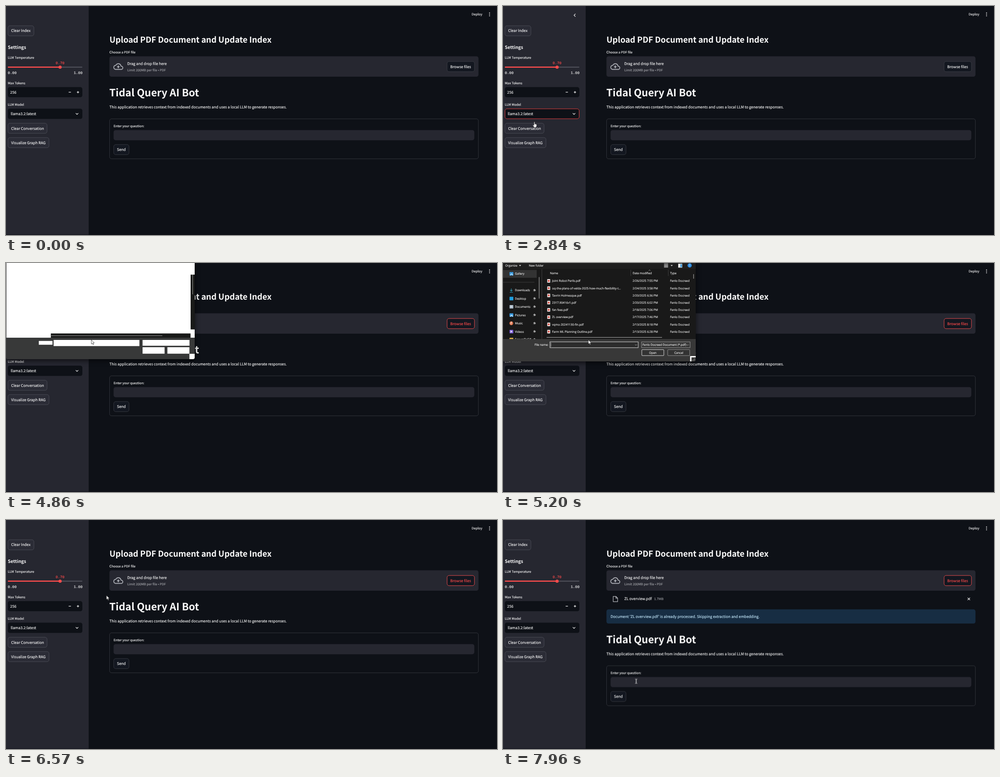
An HTML page that plays this animation: 1093 by 512 pixels, repeating every 8000 ms.

```html
<!DOCTYPE html>
<html lang="en">
<head>
<meta charset="utf-8">
<title>Document assistant</title>
<style>
html, body { margin: 0; width: 100%; height: 100%; overflow: hidden; background: #0e1117; }
svg { display: block; width: 1093px; height: 512px; }
text {
  font: 8.28px "Noto Sans CJK JP", "Noto Sans CJK SC", "Noto Sans CJK KR", "Noto Sans CJK", sans-serif;
  color: #fafafa; fill: currentColor; stroke: currentColor; stroke-width: .14px;
  text-rendering: geometricPrecision; white-space: pre;
}
.small { font-size: 7.24px; }
.muted { color: #a3a4a9; }
.mono { font: 8.2px "Liberation Mono", "Noto Sans Mono", monospace; }
.h1, .h2, .h3 { font-weight: 700; stroke: none; }
.h1 { font-size: 22.6px; }
.h2 { font-size: 18.2px; letter-spacing: -.07px; }
.h3 { font-size: 10.1px; }
.red { color: #ff4b4b; }
.btn { fill: #2b2c36; stroke: #54555d; stroke-width: .8; }
.main .btn { fill: #131720; stroke: #40434a; }
.field { fill: #0e1117; }
.panel { fill: #262730; }
.line { fill: none; stroke: #fafafa; stroke-width: 1.2; }
.ring { fill: none; stroke: #ff4b4b; stroke-width: .9; }
#dialog text { font: 6.45px "Open Sans", "Noto Sans", sans-serif; color: #f0f0f0; }
.shadow { filter: drop-shadow(0 3px 6px rgba(0,0,0,.65)); }
.thin { fill: none; stroke: #bbb; stroke-width: .8; }

.step { animation: 8s step-end infinite; }
.flow { animation: 8s linear infinite; }
@keyframes collapse { 0%, 36.5% { opacity: 0 } 10.6% { opacity: 1 } }
@keyframes focus { 0%, 51.6% { opacity: 0 } 12.5% { opacity: 1 } }
@keyframes caret {
  0%, 24.25%, 33.75%, 42%, 51.6% { opacity: 0 }
  12.5%, 30.5%, 35.75%, 48% { opacity: 1 }
}
@keyframes menu { 0%, 35.5% { opacity: 0 } 13.5% { opacity: 1 } }
@keyframes browse { 0% { opacity: 0 } 48% { opacity: 1 } }
@keyframes running { 0%, 41.25%, 92.5% { opacity: 0 } 37%, 85% { opacity: 1 } }
@keyframes uploaded { 0% { opacity: 0 } 82.5% { opacity: 1 } }
@keyframes notice { 0% { opacity: 0 } 92.5% { opacity: 1 } }
@keyframes shift {
  0% { transform: translateY(0) }
  82.5% { transform: translateY(32.2px) }
  92.5% { transform: translateY(73.5px) }
}
@keyframes anchor { 0%, 92.5% { opacity: 0 } 84.5% { opacity: 1 } }
@keyframes blank { 0%, 61.75% { opacity: 0 } 60% { opacity: 1 } }
@keyframes dialog {
  0%, 79.1% { opacity: 0 }
  61.75% { opacity: 1; transform: scale(.99) }
  62.6% { opacity: 1; transform: none }
}
@keyframes hover {
  0% { opacity: 0 }
  68% { opacity: 1; transform: translateY(32.4px) }
  70.5% { opacity: 1; transform: translateY(16.2px) }
  73.1% { opacity: 1; transform: none }
}
@keyframes arrow { 0%, 11.1%, 48%, 85% { opacity: 0 } 1.5%, 35.75%, 52% { opacity: 1 } }
@keyframes beam { 0%, 23.5% { opacity: 0 } 11.1%, 85% { opacity: 1 } }
@keyframes hand { 0%, 35.75%, 52% { opacity: 0 } 23.5%, 48% { opacity: 1 } }
@keyframes path {
  0%, 1.5% { transform: translate(857px, 473px) }
  6.2% { transform: translate(470px, 325px) }
  11.1% { transform: translate(154px, 242px) }
  13.5%, 21.1% { transform: translate(161px, 246px) }
  25% { transform: translate(115px, 268px) }
  28%, 33.5% { transform: translate(72px, 262px) }
  33.75%, 35.5% { transform: translate(69px, 259px) }
  39.5% { transform: translate(400px, 311px) }
  44.75% { transform: translate(1060px, 215px) }
  48.5%, 51.6% { transform: translate(1030px, 136px) }
  55% { transform: translate(775px, 240px) }
  56.5% { transform: translate(680px, 254px) }
  60.5%, 66.6% { transform: translate(190px, 172px) }
  70% { transform: translate(100px, 150px) }
  76%, 80% { transform: translate(143.5px, 117px) }
  86.9% { transform: translate(402px, 284px) }
  88.6%, 90% { transform: translate(404.5px, 282px) }
  97% { transform: translate(306px, 359px) }
  99.5%, 100% { transform: translate(296.5px, 360.5px) }
}
</style>
</head>
<body>
<svg viewBox="0 0 1093 512">
  <rect width="1093" height="512" fill="#0e1117"/>

  <!-- sidebar -->
  <rect class="panel" width="184" height="512"/>
  <rect y="510.5" width="1093" height="1.5" fill="#0b0d13" opacity=".6"/>
  <path class="line step" style="animation-name:collapse" d="M161.3 17.5l-3.2 3.2 3.2 3.2"/>
  <rect class="btn" x="4.3" y="44.2" width="57.8" height="22.6" rx="4.4"/>
  <text x="11.5" y="58.4">Clear Index</text>
  <text class="h3" x="4" y="96">Settings</text>
  <text class="small" x="4" y="118">LLM Temperature</text>
  <rect x="4" y="135.6" width="166" height="2.3" rx="1.1" fill="#4b4c56"/>
  <rect x="4" y="135.6" width="117" height="2.3" rx="1.1" fill="#ff4b4b"/>
  <circle cx="120.4" cy="136.7" r="3.5" fill="#ff4b4b"/>
  <text class="mono red" x="120.4" y="130" text-anchor="middle">0.70</text>
  <text class="mono" x="4" y="152.3">0.00</text>
  <text class="mono" x="170.3" y="152.3" text-anchor="end">1.00</text>
  <text class="small" x="4" y="174.6">Max Tokens</text>
  <rect class="field" x="4" y="181.3" width="166" height="22.7" rx="4.6"/>
  <text x="9.3" y="196">256</text>
  <path class="line" d="M139.5 192.7h5M157.7 192.7h5M160.2 190.2v5"/>
  <text class="small" x="4" y="222.9">LLM Model</text>
  <rect class="field" x="4" y="229.5" width="166" height="23" rx="4.6"/>
  <rect class="ring step" style="animation-name:focus" x="4.4" y="229.9" width="165.2" height="22.2" rx="4.4"/>
  <text x="10.5" y="244.1">llama3.2:latest</text>
  <rect class="step" style="animation-name:caret" x="68.1" y="235.5" width=".8" height="11" fill="#fafafa"/>
  <path class="line" d="M155.3 239.6l2.8 2.8 2.8-2.8"/>
  <rect class="btn" x="4.3" y="262.1" width="87" height="22.6" rx="4.4"/>
  <text x="11.5" y="276.5">Clear Conversation</text>
  <rect class="btn" x="4.3" y="294.2" width="91.4" height="22.6" rx="4.4"/>
  <text x="11.5" y="308.7">Visualize Graph RAG</text>
  <g class="step" style="animation-name:menu">
    <path class="field shadow" d="M4 253h166v41.5q0 4.5-4.5 4.5h-157q-4.5 0-4.5-4.5z"/>
    <rect class="panel" x="4" y="253" width="166" height="23"/>
    <text x="13.2" y="267.6">llama3.2:latest</text>
    <text x="13.2" y="290.5">deepseek-r1:14b</text>
  </g>

  <!-- header -->
  <g class="step" style="animation-name:running">
    <g fill="none" stroke="#85878d" stroke-width="1.5">
      <path d="M938.5 16.6h10M943.5 17v4M942.1 16.6v8.2M944.9 16.6v8.2"/>
      <circle cx="943.5" cy="13.6" r="1" fill="#85878d" stroke-width=".6"/>
    </g>
    <text class="small muted" x="955.5" y="21.4">RUNNING...</text>
    <text class="small" x="1005.8" y="21.4">Stop</text>
  </g>
  <text class="small" x="1036.5" y="21.4">Deploy</text>
  <path d="M1076.4 15.3h0m0 3.3h0m0 3.3h0" stroke="#fafafa" stroke-width="2" stroke-linecap="round"/>

  <!-- main page -->
  <g class="main">
    <text class="h2" x="230.3" y="81.7">Upload PDF Document and Update Index</text>
    <text class="small" x="230.3" y="106">Choose a PDF file</text>
    <rect class="panel" x="230.3" y="112.5" width="821.5" height="45.5" rx="4.6"/>
    <path transform="translate(239 124.4) scale(.915)" fill="#a5a7ae" d="M19.35 10.04A7.49 7.49 0 0 0 12 4C9.11 4 6.6 5.64 5.35 8.04A6 6 0 0 0 0 14c0 3.31 2.69 6 6 6h13c2.76 0 5-2.24 5-5 0-2.64-2.05-4.78-4.65-4.96zM19 18H6c-2.21 0-4-1.79-4-4 0-2.05 1.53-3.76 3.56-3.97l1.07-.11.5-.95A5.47 5.47 0 0 1 12 6c2.62 0 4.88 1.86 5.39 4.43l.3 1.5 1.53.11A2.98 2.98 0 0 1 22 15c0 1.65-1.35 3-3 3zM8 13h2.55v3h2.9v-3H16l-4-4z"/>
    <text x="270" y="132">Drag and drop file here</text>
    <text class="small muted" x="270" y="146.3">Limit 200MB per file • PDF</text>
    <rect class="btn" x="981.9" y="124.1" width="60.9" height="22.7" rx="4.4"/>
    <text x="989" y="138.5">Browse files</text>
    <g class="step" style="animation-name:browse">
      <rect class="ring" x="981.9" y="124.1" width="60.9" height="22.7" rx="4.4" style="fill:#131720"/>
      <text class="red" x="989" y="138.5">Browse files</text>
    </g>
    <g class="step" style="animation-name:uploaded">
      <path fill="none" stroke="#b9bbc0" stroke-width="1.2" d="M245.3 170.8h6.2l3.7 3.7v8.2h-9.9zM251.3 170.8v4h4"/>
      <text x="270" y="178.9">ZL overview.pdf</text>
      <text class="small muted" x="336.5" y="178.9">1.7MB</text>
      <path class="line" d="M1034.3 173.8l5.4 5.4m0-5.4l-5.4 5.4"/>
    </g>
    <g class="step" style="animation-name:notice">
      <rect x="230.3" y="199.8" width="821.5" height="31.8" rx="4.6" fill="#172d43"/>
      <text x="239.5" y="219.2" style="color:#c7ebff">Document 'ZL overview.pdf' is already processed. Skipping extraction and embedding.</text>
    </g>
    <g class="step" style="animation-name:shift">
      <text class="h1" x="230" y="202.3">Tidal Query AI Bot</text>
      <path class="step" style="animation-name:anchor" fill="none" stroke="#85878d" d="M437.2 194.3h-1.5a2.1 2.1 0 0 0 0 4.2h1.5M438.8 194.3h1.5a2.1 2.1 0 0 1 0 4.2h-1.5M436.2 196.4h3.6"/>
      <text x="230.3" y="228.8">This application retrieves context from indexed documents and uses a local LLM to generate responses.</text>
      <rect x="230.6" y="252.3" width="821" height="89.4" rx="4.4" fill="none" stroke="#3e4147" stroke-width=".8"/>
      <text class="small" x="239.5" y="270.5">Enter your question:</text>
      <rect class="panel" x="239.5" y="277.4" width="803" height="22.8" rx="4.6"/>
      <rect class="btn" x="239.8" y="309.8" width="34" height="22.6" rx="4.4"/>
      <text x="247" y="324.1">Send</text>
    </g>
  </g>

  <!-- file chooser before its controls are painted -->
  <g class="step" style="animation-name:blank">
    <path class="shadow" fill="#383939" d="M0 0h420v211q0 4-4 4h-412q-4 0-4-4z"/>
    <path fill="#fff" d="M1 0h419v167h-419zM73 174.3h30.5v8.5h-30.5zM106 172h191v13.8h-191zM304 172h104.5v13h-104.5zM304 188.3h49v14.5h-49zM359.3 188.3h49v14.5h-49zM408.3 203h11.7v8q0 4-4 4h-7.7z"/>
    <path fill="#191a19" d="M411 26h9v122.5h-9zM99.8 157.5h311v9.5h-311z"/>
    <path fill="none" stroke="#999" d="M415.5 26v44M100.5 162.5h247.5"/>
  </g>

  <!-- file chooser -->
  <g id="dialog" class="step" style="animation-name:dialog">
    <path class="shadow" fill="#191919" d="M0 0h429v216q0 4-4 4h-425z"/>
    <rect width="429" height="13.5" fill="#1f1f1f"/>
    <text x="5" y="8.2">Organize</text>
    <text x="57.5" y="8.2">New folder</text>
    <path fill="#ddd" d="M35.5 4.6h5l-2.5 2.7zM373 4.6h5l-2.5 2.7z"/>
    <path fill="none" stroke="#ccc" stroke-width="1.3" d="M358.5 2.2h9M358.5 4.6h9M358.5 7h9M358.5 9.4h9"/>
    <rect x="390" y="1.7" width="9" height="8.6" fill="#eee"/>
    <rect x="395" y="2.7" width="3.2" height="6.6" fill="#2a8fd6"/>
    <circle cx="415.5" cy="5.5" r="4.7" fill="#2b8be0"/>
    <text x="415.5" y="8" text-anchor="middle">?</text>
    <rect y="15.5" width="75" height="17.5" fill="#333"/>
    <path fill="none" stroke="#3f3f3f" d="M0 43h70M86.5 14v156M284.5 15v14M368 15v14"/>
    <path stroke="#999" stroke-width="1.3" d="M80.5 31.5v48M424.3 25v10M97 166.3h257"/>
    <path class="thin" d="M324 17.3l2.2-2 2.2 2"/>
    <g id="places"></g>
    <text x="104.5" y="24.7">Name</text>
    <text x="288.5" y="24.7">Date modified</text>
    <text x="372" y="24.7">Type</text>
    <rect class="step" style="animation-name:hover" x="95" y="113.5" width="324" height="14.5" fill="#4b4b4b"/>
    <g id="files"></g>
    <path fill="#383838" d="M0 170h429v46q0 4-4 4h-425z"/>
    <text x="101" y="185.2" text-anchor="end">File name:</text>
    <rect x="104.5" y="176.3" width="196.5" height="13" fill="#2c2c2c" stroke="#eee" stroke-width=".9"/>
    <path stroke="#eee" stroke-width=".7" d="M106.7 178v9.5"/>
    <path class="thin" d="M293.8 182l2.2 2.2 2.2-2.2M409 182l2.2 2.2 2.2-2.2"/>
    <rect x="308.5" y="176.3" width="108" height="13" fill="none" stroke="#aaa" stroke-width=".8"/>
    <svg x="309" y="176" style="width:96.5px;height:14px"><text x="1.5" y="9.2">Fenlo Docreed Document (*.pdf)</text></svg>
    <rect x="309" y="193.7" width="49" height="13.3" rx="1" fill="#333" stroke="#f2f2f2" stroke-width=".9"/>
    <rect x="366.7" y="193.7" width="49" height="13.3" rx="1" fill="#333" stroke="#aaa" stroke-width=".8"/>
    <text x="333.5" y="202.5" text-anchor="middle">Open</text>
    <text x="391.2" y="202.5" text-anchor="middle">Cancel</text>
    <path fill="#fff" d="M416.5 208h12.5v3h-9.5v9h-3z"/>
    <path fill="none" stroke="#aaa" stroke-width="1.2" stroke-dasharray="1.2 1" d="M426.5 213.5v5M424.3 215.7v3M422 217.5v1.2"/>
  </g>

  <!-- pointer -->
  <g class="flow" style="animation-name:path" stroke-linejoin="round">
    <path class="step" style="animation-name:arrow" fill="#fff" stroke="#222" stroke-width=".7" d="M0 0v9.3l2.2-2 1.5 3.4 1.5-.7-1.5-3.3h3z"/>
    <path class="step" style="animation-name:beam" fill="none" stroke="#ddd" stroke-width=".9" d="M-2.5-4.8h1.7q.8 0 .8.8v8q0 .8-.8.8h-1.7M2.5-4.8h-1.7q-.8 0-.8.8v8q0 .8.8.8h1.7"/>
    <path class="step" style="animation-name:hand" fill="#fff" stroke="#222" stroke-width=".6" d="M-1 .8q0-1 .9-1t.9 1v3.8l3.2.7q1.3.4 1.1 1.7l-.6 2.8-.8 2.2h-4.4l-2.7-4q-.5-1 .3-1.3t1.4.6l.7.8z"/>
  </g>
</svg>
<script>
const label = (x, y, s) => `<text x="${x}" y="${y}">${s}</text>`;

const places = [
  ["Gallery", 24, "#3a9be0"], ["Downloads", 61, "#2f9bb5"], ["Desktop", 79.4, "#1f9fe0"],
  ["Documents", 97.8, "#a9b8c6"], ["Pictures", 116.3, "#3a9be0"], ["Music", 134.8, "#e0774f"],
  ["Videos", 153.2, "#7d5fd6"], ["ScreenToGif", 171, "#e0b04a"]
];
const glyphs = {
  Downloads: "M18.5 57v6m-2.5-2.5l2.5 2.5 2.5-2.5M15 65.500h7",
  Gallery: "M16 27.5l3-3.5 3 3.5", Pictures: "M16 119.8l3-3.5 3 3.5",
  Documents: "M17 96h3M17 98.5h3", Music: "M18 137v-4.5l2-.5", Videos: "M17.5 151.5l2.5 1.7-2.5 1.7z"
};
document.getElementById("places").innerHTML = places.map(([name, y, color]) => {
  const shape = name == "Downloads" ? "" : name == "Music"
    ? `<circle cx="18.5" cy="${y}" r="4.2" fill="${color}"/>`
    : `<rect x="14.5" y="${y - 3.8}" width="8.5" height="7.8" rx="1" fill="${color}"/>`;
  const ink = name == "Downloads" ? color : "#fff";
  const pin = name == "Gallery" ? ""
    : `<path d="M70 ${y - 3}l3 3-1 .4-1.3 2-3.2-3.2 2-1.2zM69 ${y + 1}l-2 2" fill="#aaa" stroke="#aaa" stroke-width=".6"/>`;
  return shape + `<path d="${glyphs[name] || ""}" fill="none" stroke="${ink}" stroke-width="1.1"/>` + label(26.5, y + 2.3, name) + pin;
}).join("");

const files = [
  ["Joint Robot Perils.pdf", "2/26/2025 7:55 PM"],
  ["oq-the-plans-of-velda-2025-how-much-flexibility-t...", "2/24/2025 3:58 PM"],
  ["Tavrin Holmesque.pdf", "2/20/2025 6:36 PM"],
  ["2317.90416v1.pdf", "2/20/2025 6:02 PM"],
  ["fan fees.pdf", "2/18/2025 7:06 PM"],
  ["ZL overview.pdf", "2/17/2025 7:46 PM"],
  ["vqmo-20241130-fin.pdf", "2/13/2025 8:18 PM"],
  ["Farm ML Planning Outline.pdf", "2/13/2025 6:28 PM"]
];
document.getElementById("files").innerHTML = files.map(([name, date], i) => {
  const y = 40 + i * 16.2;
  return `<rect x="98.5" y="${y - 4}" width="6.6" height="8" rx=".6" fill="#f0e6e4"/>` +
    `<rect x="100" y="${y - 1.8}" width="3.6" height="3.6" fill="#d8483e"/>` +
    label(109.3, y + 2.4, name) + label(288.5, y + 2.4, date) + label(372, y + 2.4, "Fenlo Docreed");
}).join("");
</script>
</body>
</html>
```
